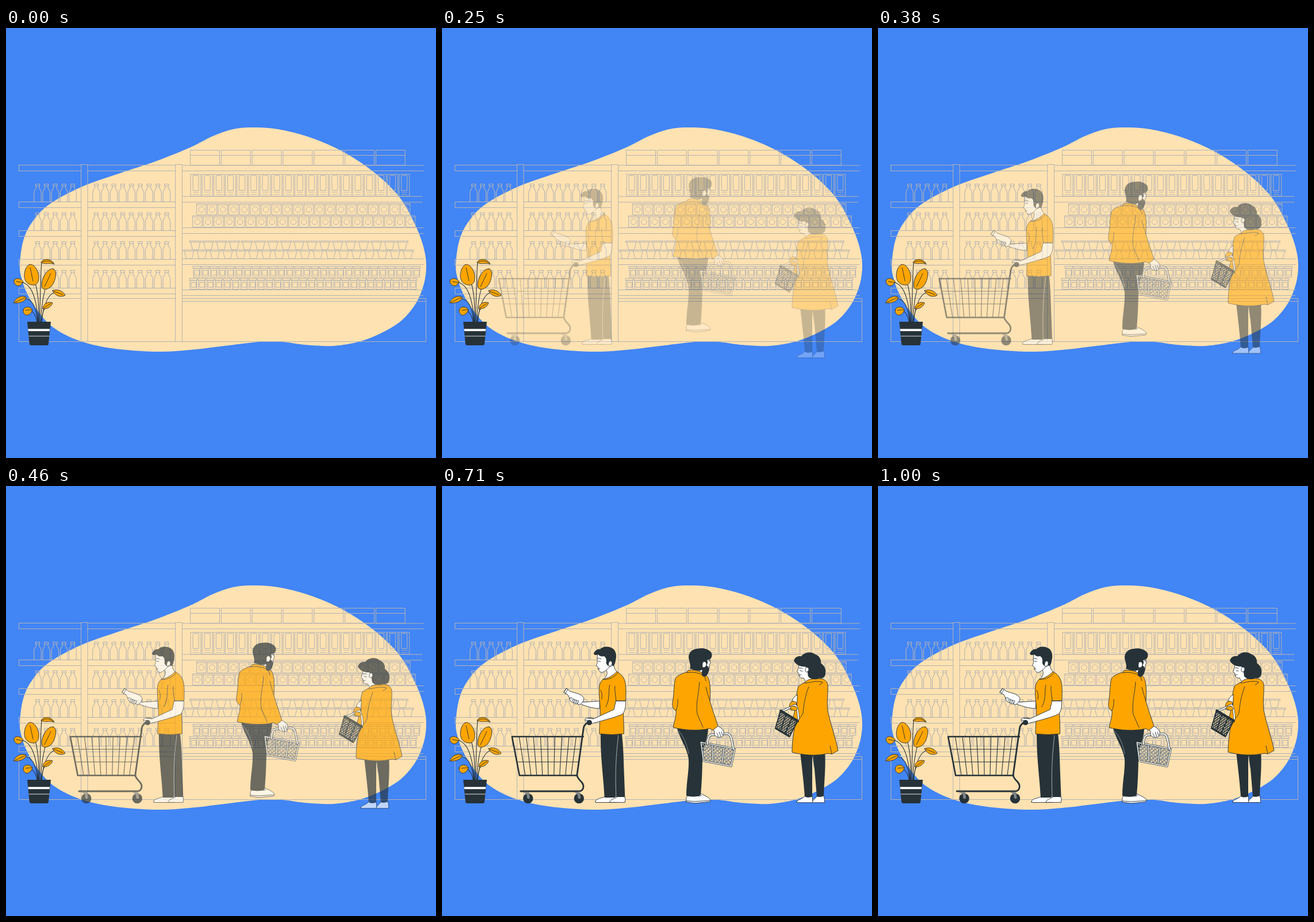
An HTML page with a canvas for the animation above (1.04 s loop, 748 px wide and 748 px high).

```html
<!DOCTYPE html>
<html lang="en">
<head>
<meta charset="utf-8">
<title>Supermarket</title>
<style>
html, body { margin: 0; width: 100%; height: 100%; overflow: hidden; background: #4285f5; }
canvas { display: block; width: 100vw; height: 100vh; }
</style>
</head>
<body>
<canvas id="stage" width="748" height="748"></canvas>
<script>
const SIZE = 748, LOOP = 1040, FPS = 24, RISE = 750, SHIFT = 31;
const BLUE = '#4285f5', SAND = '#ffe2b1', GREY = '#b3b3b3';
const DARK = '#263238', ORANGE = '#ffa500', WHITE = '#fff';

function layer() {
  const c = document.createElement('canvas');
  c.width = c.height = SIZE;
  const g = c.getContext('2d');
  g.lineJoin = g.lineCap = 'round';
  return g;
}

const stage = document.getElementById('stage').getContext('2d');
const back = layer(), front = layer(), group = layer();
let g = back;

function shape(d, fill, line = DARK, w = 0.9) {
  const p = new Path2D(d);
  if (fill) { g.fillStyle = fill; g.fill(p); }
  if (line) { g.strokeStyle = line; g.lineWidth = w; g.stroke(p); }
}
const stroke = (d, line = DARK, w = 0.9) => shape(d, null, line, w);

function disc(x, y, r, fill, line) {
  g.beginPath();
  g.arc(x, y, r, 0, 7);
  if (fill) { g.fillStyle = fill; g.fill(); }
  if (line) { g.strokeStyle = line; g.lineWidth = 0.9; g.stroke(); }
}

function repeat(n, x, step, draw) {
  for (let i = 0; i < n; i++) draw(x + i * step);
}

// Closed smooth curve through x,y pairs
function smooth(v, fill) {
  const n = v.length / 2, at = i => [v[(i + n) % n * 2], v[(i + n) % n * 2 + 1]];
  g.beginPath();
  g.moveTo(v[0], v[1]);
  for (let i = 0; i < n; i++) {
    const [a, b, c, d] = [at(i - 1), at(i), at(i + 1), at(i + 2)];
    g.bezierCurveTo(b[0] + (c[0] - a[0]) / 6, b[1] + (c[1] - a[1]) / 6,
      c[0] - (d[0] - b[0]) / 6, c[1] - (d[1] - b[1]) / 6, c[0], c[1]);
  }
  g.fillStyle = fill;
  g.fill();
}

// ---- Shop ----
const grey = (d, w = 1) => stroke(d, GREY, w);
const box = (x, y, w, h) => grey(`M${x} ${y}h${w}v${h}h${-w}z`);

function bottle(x, y) {
  grey(`M${x - 3.5} ${y}h7v3.5h-7zM${x - 2.7} ${y + 3.5}v3c-.5 3-3.6 4-3.6 8v14.5q0 2 2 2h8.6q2 0 2-2v-14.5c0-4-3.1-5-3.6-8v-3`, 1.1);
}

function carton(x) {
  box(x, 254.5, 17.6, 38);
  box(x + 4, 256.5, 9.6, 26);
  grey(`M${x + 4} 285.5h9.6M${x + 4} 289.5h9.6`, 0.8);
}

function tin(x, y, w) {
  box(x, y, w, 19.5);
  grey(`M${x} ${y + 2.3}h${w}`, 0.8);
  disc(x + w / 2, y + 10.3, 5, null, GREY);
}

function cup(x, y) {
  grey(`M${x} ${y}h20v2.2h-20zM${x + 1.8} ${y + 2.2}l3.2 13h10l3.2-13`);
}

function jar(x, y) {
  box(x, y, 13, 3.5);
  box(x + 1, y + 3.5, 11, 15.5);
  box(x + 3, y + 7, 8, 8.5);
}

function shop() {
  g.fillStyle = BLUE;
  g.fillRect(0, 0, SIZE, SIZE);
  smooth([24, 412, 30, 370, 46, 337, 75, 307, 130, 277, 200, 252, 260, 232, 320, 208,
    360, 188, 395, 176, 430, 173, 473, 176, 522, 188, 572, 208, 620, 236, 660, 268,
    690, 302, 713, 345, 726, 380, 731, 412, 727, 445, 713, 479, 690, 507, 660, 527,
    620, 544, 580, 552, 550, 553, 515, 550.5, 490, 547, 462, 545, 430, 547, 380, 553,
    330, 559, 275, 563, 220, 561, 170, 555, 130, 545, 98, 531, 73, 513, 50, 485, 35, 458, 27, 435], SAND);

  for (const y of [238.5, 302.5, 352.5, 402.5, 452.5]) {
    grey(`M131 ${y}H22.5v10H131M142 ${y}H295m0 10H142`);
  }
  grey('M131 470.5H22.5V545.5H730.5V470.5M142 470.5H295');
  box(131, 237.5, 11, 308);
  box(295, 237.5, 11.5, 308);
  for (const y of [271.5, 321.5, 371.5, 421.5]) {
    repeat(5, 55, 15.25, x => bottle(x, y));
    repeat(9, 157, 15.3, x => bottle(x, y));
  }

  grey('M307 239H726M307 248.5H726M307 293H724M307 303H724M307 347.5H726M307 357.5H726');
  grey('M307 401.5H726M307 411.5H726M307 455.5H726M307 465.5H726M307 470.5H730M307 475.5H730');
  repeat(7, 321, 53.8, x => { box(x, 212.5, 50.5, 26); grey(`M${x} 221.5h50.5`); });
  repeat(19, 321.5, 20.15, carton);
  repeat(20, 332, 18.68, x => tin(x, 305.5, 16));
  repeat(21, 325, 18.55, x => tin(x, 326.8, 16));
  repeat(17, 319.5, 22.5, x => cup(x, 370.5));
  repeat(18, 308.5, 22.4, x => cup(x, 386));
  repeat(27, 325.5, 14.7, x => jar(x, 414.5));
  repeat(27, 319.5, 14.7, x => jar(x, 435.5));
}

function plant() {
  stroke('M57 511C57 480 57 460 47 430M58 511C60 470 60 425 62 408M56 511C53 470 45 445 26 442M55 511C53 484 44 470 32 471M60 511C62 480 66 450 76 436M61 511C66 480 74 461 86 460M62 511C64 496 64 490 70 485M54 511C52 500 48 492 39 491', DARK, 1.1);
  shape('M61 408C64 400 79 400 84 411C77 408 70 411 64 409Z', ORANGE);
  shape('M40 412C47 408 56 420 57 432C58 442 53 448 46 447C37 446 32 440 32 431C32 422 35 415 40 412Z', ORANGE);
  shape('M82 419C89 421 87 434 83 443C79 452 69 457 64 453C60 449 63 437 67 430C71 423 77 418 82 419Z', ORANGE);
  shape('M14 439C17 434 25 435 30 441C27 447 23 450 19 448C15 446 13 442 14 439Z', ORANGE);
  shape('M13.5 478C16 470 26 464 35 468C35 475 23 480 13.5 478Z', ORANGE);
  shape('M30 491C31 484 41 483 46 490C44 497 38 501 34 499C31 497 29 494 30 491Z', ORANGE);
  shape('M81 457C89 453 99 457 103 465C96 469 86 467 81 457Z', ORANGE);
  shape('M64 488C64 480 73 475 81 478C79 485 71 490 64 488Z', ORANGE);
  stroke('M42 417L47 440M78 427L67 450M18 441L30 443M16 477L33 469M34 491L45 490M83 458L99 464M66 487L78 479M63 407Q73 402 82 409');
  shape('M37 511H78L74 549Q74 552 71 552H44Q41 552 40.7 549Z', DARK, null);
  shape('M38.3 523.5H76.2L75.8 527.3H38.8Z', WHITE, null);
  stroke('M40 536H75', '#dfe2e3', 1);
}

// ---- People ----
function cart() {
  for (let i = 1; i < 10; i++) stroke(`M${122 + i * 12.4} 436L${135 + i * 10} 503`, DARK, 1.1);
  stroke('M126 458H243M130.5 480H239', DARK, 1.1);
  stroke('M122 436H246M122 436L135 503.5H235.5', DARK, 2.6);
  stroke('M256 411.5Q248 413 246.5 421L235 503.5Q236 508 243 515C249 522 246 531 238 531H137', DARK, 2.8);
  for (const x of [150, 238.5]) {
    disc(x, 543.5, 8.7, DARK);
    shape(`M${x - 8} 533H${x + 2}L${x + 3} 543Q${x} 546 ${x - 2} 542Q${x - 1} 536 ${x - 8} 533Z`, '#7d8486', null);
  }
}

function shopper() {
  cart();
  shape('M267 549C267 544 276 544 284 540H304V550.5H268Q266 550.5 267 549Z', WHITE);
  shape('M292 550C293 545 299 545 306 540H318Q320 545 318.5 550Z', WHITE);
  shape('M276 430H313C316 455 316 475 317 500L318.5 541H304L303 539L301 542H283C281 505 276 475 276 430Z', DARK, null);
  stroke('M307 434C304 460 301 490 303 540', '#dde0e1', 0.7);

  // Arm with the bottle
  shape('M274 387C262 387 251 383 243 380L232 377C227 375 225 370 228 369L240 373L246 376L274 374Z', WHITE);
  shape('M217 352L223 357L239 362C244 365 248 368 247 371C245 377 241 381 237 380L222 369L219 363L212 359Z', WHITE);
  stroke('M217 352L212 359M219 354L214.5 361.5');
  shape('M222 369Q225 367 229 371L238 374Q237 380 232 379L225 375Q222 372 222 369Z', WHITE);
  stroke('M226 371L230 377M229 371L233 378M233 373L236 378');

  // Neck, shirt and head
  shape('M283 316L299 309C299 317 302 321 306 324L289 338L280 337C287 332 289 326 286 320Z', WHITE);
  shape('M281 336C288 335 298 330 304 323C311 326 317 332 319 342C321 352 320 363 320 373L315 374C315 395 317 412 316.5 431Q296 434 274 431C274 410 277 398 275 382C274 365 272 353 275 344C277 340 278 338 281 336Z', ORANGE);
  stroke('M281 336C290 338 301 332 306 325M301 348C300 357 303 366 303 374M303 373.5H319M292 346C289 359 293 371 285 384M276 355Q280 362 278 371');
  shape('M303 374H319.5C320 384 319 391 314 397C300 403 280 408 265 412C258 415 252 413 249.5 409C248 406 250 403 254 404L264 405L299 389Z', WHITE);
  stroke('M250 407Q256 408 260 412M254 404Q260 401 264 405');
  disc(256.5, 411.5, 4.6, DARK);
  shape('M271 293C270 299 270 303 270.5 307L268.5 313L272 315C272 321 275 325 280 324C284 322 288 319 291 315L299 311L297 292L281 288Z', WHITE, DARK, 0.8);
  shape('M264 292C266 286 271 283 275 284C279 279 289 278 296 282C302 285 304 293 303 299C302 305 301 312 298 313L295 311C297 306 294 303 291 306L289 313L286 309C286 304 287 299 282 296C278 297 274 296 272 293C269 295 265 294 264 292Z', DARK, null);
  shape('M290 309C290 304 295 303 296 307C297 311 293 315 290 313Z', WHITE);
  stroke('M271 300Q274 299 277 301M272 304.5L276 305.5M271 318L275 318', DARK, 0.9);
}

// Basket in local units: a 60 by 32 tapered body
function basket(line, edge, weave) {
  const body = 'M0 0H60L54 32H5Z';
  g.save();
  g.clip(new Path2D(body));
  for (let x = -32; x < 64; x += 6.5) {
    stroke(`M${x} 0L${x + 32} 32M${x + 32} 0L${x} 32`, edge, weave + 0.7);
    if (line !== edge) stroke(`M${x} 0L${x + 32} 32M${x + 32} 0L${x} 32`, line, weave);
  }
  g.restore();
  for (const d of ['M20 1L22 31M41 1L38 31', body]) {
    stroke(d, edge, 3.2);
    stroke(d, line, 1.7);
  }
}

function bearded() {
  shape('M425 546C424 541 428 537 432 539L449 534C455 539 466 541 467 547Q467 550 462 550L440 552L425 550Z', WHITE);
  stroke('M425 548L440 549L466 547.5M444 539Q449 541 452 538');
  shape('M409 421H463C463 438 456 451 453 468C453 492 452 515 450 538C442 542 432 541 425 539C425 515 430 496 429 475C426 455 413 439 409 421Z', DARK, null);
  stroke('M412 427C420 436 426 448 429 466', '#a9afb1', 0.7);

  g.save();
  g.transform(0.98, 0.19, -0.02, 0.98, 450.5, 446);
  basket('#f2f2ee', DARK, 0.9);
  g.restore();
  const grip = 'M462 449C462 441 463 434 469 433L495 431C501 431 503 436 504 443L507 458';
  stroke(grip, DARK, 4);
  stroke(grip, '#f2f2ee', 2.5);

  shape('M469 421L478 416C483 420 488 422 490 427C491 433 488 438 485 437C481 438 477 437 474 433L474 427Z', WHITE);
  stroke('M478 430L481 436M482 428L485 436M486 428L488 434');

  shape('M452 303L461 296L466 293C466 299 465 303 467 308L465 312L464 322L456 330L448 326Z', WHITE);
  shape('M428 321C436 319 447 321 455 327C459 329 464 333 465 340C467 351 467 362 466 374C470 390 476 404 480 418L471 425L466 422C446 427 419 425 402 420C404 410 408 400 407 391C402 389 400 383 401 377C404 362 403 346 406 335C410 329 419 326 426 324Z', ORANGE);
  stroke('M426 325C437 323 449 325 457 332L459 339M448 341C447 362 441 377 444 397L454 420M407 391Q411 382 410 371M459 350Q462 363 466 374');
  shape('M429 297C430 288 437 283 447 283C456 281 466 285 469 291C471 298 467 303 461 303C463 307 462 310 460 312C464 314 465 319 464 322C463 328 459 333 455 332C451 330 451 325 453 320C446 323 438 320 431 318C434 311 429 305 429 297Z', DARK, null);
  shape('M453 309C454 304 460 305 460 310C460 315 455 318 453 315Z', WHITE);
  stroke('M463 304Q465 303 466 304', DARK, 1);
}

function lady() {
  shape('M617 549C618 545 627 545 632 538H644L645 550.5H618Q616 551 617 549Z', WHITE);
  shape('M644 550C645 545 650 544 653 538H664Q666 544 665.5 550.5H645Z', WHITE);
  shape('M623 462H666C668 485 665 512 664 539Q658 542 652 540L648 492L644 470L644 540Q637 543 631 540C629 512 626 489 623 462Z', DARK, null);
  stroke('M645 470L647 490', '#a9afb1', 0.8);

  shape('M621 309C620 315 620 318 617.5 323L621 326C621 331 623 335 629 334L633 341L642 338L646 314Z', WHITE);
  shape('M632 341C635 336 643 335 653 335C662 334 669 337 671 345C672 359 669 374 671 390C676 416 685 438 689 460L678 466L672 465C650 470 629 468 609 463C609 444 612 424 616 407C611 405 610 400 613 395C615 379 616 361 620 348C624 345 628 343 632 341Z', ORANGE);
  stroke('M631 343C642 341 654 338 662 341M638 349C632 363 629 382 628 395C624 403 620 407 616 407M678 466L675 452M656 346L662 342');
  shape('M612 304C614 296 621 295 625 296C630 288 644 287 650 293C657 295 660 303 659 308C665 312 668 318 667 324C668 331 662 336 656 334C650 338 641 336 637 331C636 325 636 319 632 314C627 314 618 314 612 304Z', DARK, null);
  shape('M632 319C632 314 637 314 638 318C638 323 633 325 632 322Z', WHITE);
  stroke('M621 316L627 317M623 321L627 322M621 329L625 328');

  // Hands and basket
  shape('M618 363C612 366 609 371 609 377L617 382Z', WHITE);
  shape('M605 388C603 380 606 375 611 374L616 376C618 382 614 387 609 390Z', ORANGE);
  const grip = 'M587 399Q589 391 595 390L614 381Q619 382 620 405';
  stroke(grip, DARK, 3.8);
  stroke(grip, WHITE, 2.3);
  g.save();
  g.transform(0.5, 0.3, -0.36, 0.92, 589, 390);
  basket(DARK, DARK, 1);
  g.restore();
  stroke('M589 391L619 409', DARK, 4);
  shape('M606 385C611 381 617 383 618 387C618 391 613 391 609 389Z', ORANGE);
}

g = back;
shop();
g = front;
plant();

const people = [[shopper, -1, 0], [bearded, 0, -1], [lady, 0, 1]];

function frame(now) {
  const k = Math.floor((now % LOOP + 5) * FPS / 1000);
  const p = Math.min(1, k * 1000 / FPS / RISE);
  const ease = (1 - Math.cos(Math.PI * p)) / 2;
  const off = SHIFT * (1 - ease);

  g = group;
  g.clearRect(0, 0, SIZE, SIZE);
  for (const [draw, dx, dy] of people) {
    g.save();
    g.translate(dx * off, dy * off);
    draw();
    g.restore();
  }
  stage.drawImage(back.canvas, 0, 0);
  stage.globalAlpha = ease;
  stage.drawImage(group.canvas, 0, 0);
  stage.globalAlpha = 1;
  stage.drawImage(front.canvas, 0, 0);
}

const start = performance.now();
function tick() {
  frame(performance.now() - start);
  requestAnimationFrame(tick);
}
tick();
</script>
</body>
</html>
```
